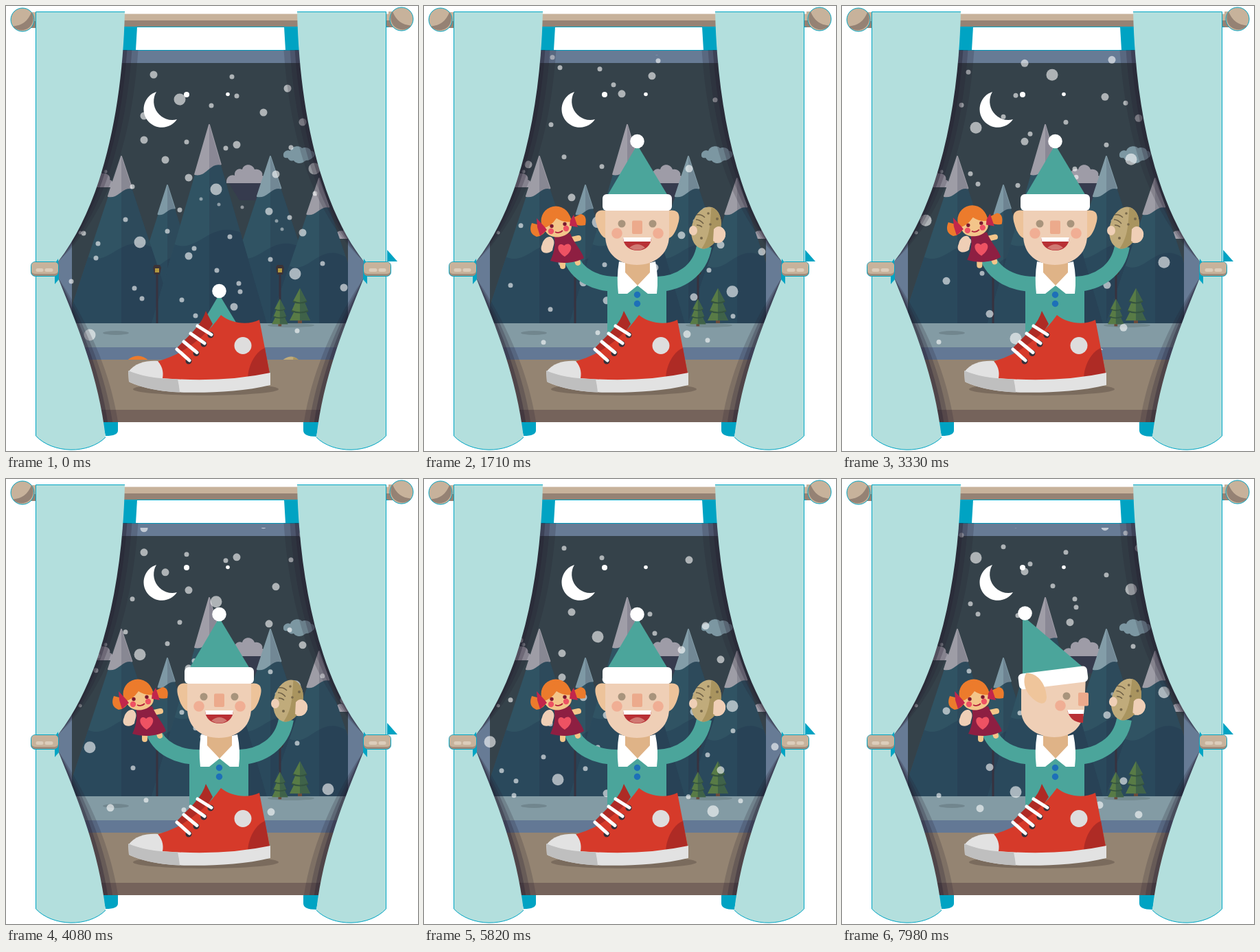
An HTML page for the animation above (8 s loop, 600 by 648 pixels).

```html
<!DOCTYPE html>
<html lang="en">
<head>
<meta charset="utf-8">
<title>Elf in a shoe</title>
<style>
html, body { margin: 0; height: 100%; overflow: hidden; background: #fff; }
svg { display: block; width: 100%; height: 100%; }
.teal { fill: #4ba59b; }
.skin { fill: #efcfb6; }
.white { fill: #fff; }
.sleeve { fill: none; stroke: #4ba59b; stroke-width: 22; }
</style>
</head>
<body>
<svg viewBox="0 0 600 648">
  <defs>
    <clipPath id="glass"><rect x="96" y="83" width="402" height="414"/></clipPath>
    <clipPath id="snowArea"><rect x="70" y="71" width="450" height="430"/></clipPath>
    <clipPath id="windowArea"><rect x="72" y="64" width="453" height="542"/></clipPath>
    <clipPath id="aboveSill"><rect width="600" height="515"/></clipPath>
    <clipPath id="potatoShape"><ellipse cx="411" cy="323" rx="21" ry="31" transform="rotate(15 411 323)"/></clipPath>
    <g id="shade" fill="#241f30">
      <path d="M173 8H179C176 150 147 290 76 372ZM76 396C103 452 141 532 151 628H100Z" opacity=".35"/>
      <path d="M173 8H186C183 150 155 290 76 372ZM76 396C108 452 148 532 158 628H100Z" opacity=".25"/>
      <path d="M173 8H195C192 150 165 290 76 372ZM76 396C114 452 156 532 166 628H100Z" opacity=".2"/>
    </g>
    <g id="curtain">
      <path d="M43 8H173C170 150 140 290 76 372V396C98 452 134 532 145 628C120 653 68 652 43 626Z" fill="#b3dfdd"/>
      <path d="M173 8.500H43.500V626C68 652 120 653 145 628" fill="none" stroke="#00a5c4"/>
      <path d="M76 368L71 375V405L77 398Z" fill="#00a5c4"/>
      <rect x="36.500" y="372.500" width="40" height="21" rx="6" fill="#a08c7b" stroke="#00a5c4"/>
      <rect x="37" y="373" width="39" height="17" rx="5" fill="#c7b29b"/>
      <path d="M46 384.500H52M59 384.500H66" stroke="#dccdbb" stroke-width="5" stroke-linecap="round"/>
    </g>
    <g id="knob">
      <path d="M34 9H43V32H34Z" fill="#c7b29b"/>
      <path d="M37 22H43V32H37Z" fill="#958274"/>
      <circle cx="24" cy="20" r="17" fill="#c7b29b" stroke="#00a5c4"/>
      <path d="M10 29.500Q30 28 37 9A17 17 0 0 1 10 29.500Z" fill="#958274"/>
    </g>
    <g id="lamp">
      <path d="M220 389V462" stroke="#37323f" stroke-width="3"/>
      <path d="M214 381L216 377H224L226 381L224 391H216Z" fill="#3b3338"/>
      <path d="M217 382H223V388H217Z" fill="#b3983f"/>
    </g>
    <g id="tree">
      <path d="M425 452H431V462H425Z" fill="#6b4b3c"/>
      <path d="M428 411L438 430H434L440 444H436L443 458H413L420 444H416L422 430H418Z" fill="#587b46"/>
      <path d="M428 411L438 430H434L440 444H436L443 458H428Z" fill="#3f6249"/>
      <path d="M418 430Q428 435 438 430M416 444Q428 449 440 444" stroke="#34533f" stroke-width="2" fill="none"/>
    </g>
    <path id="cloud" d="M321 258C320 247 330 245 333 247C332 238 340 236 344 238C346 229 359 229 362 238C370 236 375 243 373 247C378 248 379 254 377 258Z"/>
  </defs>

  <path d="M168 30H191L189 64H168ZM428 30H405L407 64H428ZM140 605H163V618Q163 626 145 626ZM456 605H433V618Q433 627 452 627ZM555 355L570 372H555Z" fill="#00a3c3"/>
  <path d="M40 11.500H558V31H40Z" fill="#c7b29b"/>
  <path d="M40 21H558V31H40Z" fill="#958274"/>
  <path d="M40 30.500H558" stroke="#00a5c4"/>
  <use href="#knob"/>
  <use href="#knob" transform="matrix(-1 0 0 1 600 -1)"/>

  <path d="M72 64H525V606H72Z" fill="#677b95"/>
  <path d="M160 64.500H437" stroke="#0096b8"/>
  <path d="M72 462H525V497H72Z" fill="#839ba4"/>
  <path d="M72 497H525V515H72Z" fill="#637895"/>
  <path d="M72 515H525V588H72Z" fill="#948472"/>
  <path d="M72 588H525V606H72Z" fill="#75635b"/>

  <g clip-path="url(#glass)">
    <path d="M96 83H498V463H96Z" fill="#35424a"/>
    <path d="M219 125A26.500 26.500 0 1 0 249 165A27 27 0 0 1 219 125Z" class="white"/>
    <circle cx="263" cy="129" r="4" class="white"/>
    <circle cx="323" cy="128.500" r="2.800" class="white"/>
    <path d="M324 257H375V283H340Z" fill="#363b4e"/>
    <g fill="#9e9ca7">
      <use href="#cloud"/>
      <use href="#cloud" transform="translate(-222 6)"/>
      <use href="#cloud" transform="translate(158 81)"/>
    </g>
    <g id="mountains"></g>
    <path d="M404 218C403 211 411 209 414 211C417 203 428 203 431 207C437 204 444 208 444 211C450 211 452 219 446 221C442 226 437 224 435 226C430 231 421 229 419 225C413 227 411 222 410 221C406 222 404 220 404 218Z" fill="#7c97a2"/>
    <path d="M96 462H498V497H96Z" fill="#839ba4"/>
    <ellipse cx="160" cy="476" rx="19" ry="3" fill="#71868e"/>
    <ellipse cx="415" cy="465" rx="34" ry="3" fill="#748b91"/>
    <use href="#lamp"/>
    <use href="#lamp" x="179"/>
    <use href="#tree"/>
    <use href="#tree" transform="translate(65 106) scale(.78)"/>
    <g id="stars" fill="#fff" opacity=".45"></g>
  </g>

  <g clip-path="url(#snowArea)">
    <g id="snow">
      <g id="flakes" fill="#fff" fill-opacity=".6"></g>
      <use href="#flakes" y="-515"/>
      <use href="#flakes" y="-1064"/>
    </g>
  </g>

  <g clip-path="url(#windowArea)">
    <use href="#shade"/>
    <use href="#shade" transform="matrix(-1 0 0 1 597 0)"/>
  </g>

  <ellipse cx="291" cy="558" rx="106" ry="9" fill="#66584d" opacity=".55"/>

  <g clip-path="url(#aboveSill)">
    <g id="elf">
      <path id="leftSleeve" class="sleeve"/>
      <path id="rightSleeve" class="sleeve"/>
      <g id="doll">
        <path d="M202 366V379M221 364L224 374" stroke="#f3c58a" stroke-width="8" stroke-linecap="round"/>
        <path d="M211 341L225 338" stroke="#f3c58a" stroke-width="8" stroke-linecap="round"/>
        <path d="M189 334L213 331C218 345 229 355 233 367C220 375 200 376 184 371C190 358 192 346 189 334Z" fill="#8e1f42"/>
        <path d="M205 365C189 355 196 342 204 349C212 341 222 353 205 365Z" fill="#ee5263"/>
        <path d="M176 321L157 316Q151 331 164 336Q176 334 178 324ZM214 310L228 303Q238 304 235 319Q224 322 214 314Z" fill="#ec7b2c"/>
        <circle cx="192" cy="313" r="21.500" fill="#ec7b2c"/>
        <ellipse cx="195.500" cy="322.500" rx="19.500" ry="14" fill="#f3c58a" transform="rotate(-9 195 322)"/>
        <path d="M174 323Q184 322 193 309Q203 316 215 314Q212 295 193 298Q175 302 174 323Z" fill="#ec7b2c"/>
        <path d="M176 322L164 309L165 322L169 335L179 326ZM213 312L218 304L224 322L212 320Z" fill="#c2264b"/>
        <circle cx="186" cy="320.500" r="2.700" fill="#7b1930"/>
        <circle cx="205" cy="317.500" r="2.700" fill="#7b1930"/>
        <circle cx="185" cy="328" r="4.200" fill="#ee5263"/>
        <circle cx="207" cy="324" r="4.200" fill="#ee5263"/>
        <path d="M191 329Q197 332 202 327" fill="none" stroke="#b3203c" stroke-width="1.800"/>
        <path d="M172 347C174 338 183 333 187 338C192 344 188 349 187 356C180 363 166 360 172 347Z" class="skin"/>
      </g>
      <g id="potato">
        <path d="M420 322C427 315 441 325 439 334C438 344 427 349 417 342Z" class="skin"/>
        <g clip-path="url(#potatoShape)">
          <path d="M385 288H440V358H385Z" fill="#c0ab7b"/>
          <path d="M419 288C416 315 419 335 401 358H440V288Z" fill="#a9945f"/>
        </g>
        <path d="M397 304Q404 303 409 308M396 311Q402 311 407 317M397 319Q402 319 405 322" fill="none" stroke="#6f6046" stroke-width="1.500"/>
        <g fill="#77684a">
          <circle cx="414" cy="302" r="1.800"/><circle cx="427" cy="310" r="2"/><circle cx="417" cy="318" r="1.800"/><circle cx="404" cy="338" r="2"/><circle cx="424" cy="325" r="1.500"/>
        </g>
        <ellipse cx="392" cy="327" rx="6" ry="7" class="skin"/>
        <path d="M422 325C430 315 441 326 439 334C437 344 428 348 421 342Z" class="skin"/>
      </g>
      <path d="M267 401Q267 394 283 394H338Q353 394 353 403V530H267Z" class="teal"/>
      <path d="M293 368H329V392L311 408L293 392Z" fill="#dfb387"/>
      <path d="M284 372Q280 396 283 419H296L311 407L326 419H339Q342 396 337 372L329 374V388L311 407L293 388V374Z" class="white"/>
      <circle cx="310.500" cy="420.500" r="4.700" fill="#1d70b8"/>
      <circle cx="310.500" cy="433.500" r="4.700" fill="#1d70b8"/>

      <g id="front">
        <path d="M266 298C250 295 247 304 251 317C255 332 262 341 270 338ZM355 298C371 295 374 304 370 317C366 332 359 341 351 338Z" fill="#edc39a"/>
        <path d="M264 290H357V334C357 362 335 377 310 377C285 377 264 362 264 334Z" class="skin"/>
        <path d="M310.500 202L267 276H355Z" class="teal"/>
        <rect x="260" y="274" width="101" height="24" rx="6" class="white"/>
        <circle cx="310.500" cy="197" r="10.300" class="white"/>
        <circle cx="288" cy="317" r="5.500" fill="#a8947c"/>
        <circle cx="333" cy="317" r="5.500" fill="#a8947c"/>
        <rect x="303" y="312.500" width="15" height="19.500" rx="2" fill="#ecaa8c"/>
        <circle cx="281" cy="331" r="7.800" fill="#f0ae94"/>
        <circle cx="341" cy="331" r="7.800" fill="#f0ae94"/>
        <path d="M290 337H331C331 349 322 356 311 356C299 356 290 349 290 337Z" fill="#b83035"/>
        <path d="M299 352Q311 342 322 352Q311 359 299 352Z" fill="#d07872"/>
        <path d="M290 337H331L330 343H291Z" class="white"/>
      </g>
      <g id="side">
        <path d="M266 288L360 297V340C358 362 335 376 312 376C285 376 270 360 268 335Z" class="skin"/>
        <path d="M358 199L269 275L358 286Z" class="teal"/>
        <rect x="263" y="278" width="101" height="23" rx="6" class="white" transform="rotate(7 314 290)"/>
        <circle cx="354.500" cy="195.500" r="10.300" class="white"/>
        <path d="M323 318C324 295 340 281 353 283C358 292 356 308 345 318C335 328 324 331 323 318Z" fill="#efc59b"/>
        <rect x="262" y="311" width="15" height="19.500" rx="2" fill="#ecaa8c"/>
        <circle cx="294" cy="316" r="5.500" fill="#a8947c"/>
        <circle cx="303" cy="330" r="7.800" fill="#f0ae94"/>
        <path d="M269 336H293C291 347 283 355 270 355Z" fill="#b83035"/>
        <path d="M269 336H293L291 342H269Z" class="white"/>
      </g>
    </g>
  </g>

  <path d="M291 444C285 465 266 480 246 501L270 510L301 463Z" fill="#ae2b25"/>
  <path d="M313 450C329 463 353 465 369 457L385 540L300 550L220 545L222 517C255 508 288 485 313 450Z" fill="#d63a2a"/>
  <path d="M352 542C353 519 366 502 377 498L385 542Z" fill="#ae2b25"/>
  <circle cx="345" cy="494.500" r="12.500" fill="#dedddd"/>
  <path d="M178 533C188 519 206 516 221 517C229 526 230 536 227 546L180 541Z" fill="#e2e2e2"/>
  <path d="M178 531C192 537 215 542 228 542Q315 549 385 534V552C340 563 280 564 245 562C215 560 190 553 179 547Z" fill="#e2e2e2"/>
  <path d="M178 531C194 538 218 543 250 543.500Q252 552 253 562.500C215 561 190 553 179 547Z" fill="#bfbfbf"/>
  <path d="M298 479h0M288 492h0M277 505.500h0M266 517h0" stroke="#33303a" stroke-width="9" stroke-linecap="round"/>
  <path d="M279 466L299 478.500M269 477L289 491M259 489L278 504.500M249 500L267 516" stroke="#fff" stroke-width="5" stroke-linecap="round"/>

  <use href="#curtain"/>
  <use href="#curtain" transform="matrix(-1 0 0 1 597 0)"/>
</svg>
<script>
const LOOP = 8000, STEP = 30, FALL = 0.1046;
const byId = id => document.getElementById(id);

// x, y pairs grouped by flake radius
const large = [253,136, 449,237, 306,267, 195,344, 421,390, 122,479, 96,289, 469,540];
const medium = [215,100, 410,120, 375,155, 201,160, 432,169, 201,195, 336,202, 232,224,
  393,245, 266,250, 383,299, 432,330, 266,364, 492,410, 332,438, 288,464, 492,179,
  152,567, 386,573, 511,296];
const small = [329,103, 336,131, 299,145, 263,198, 320,207, 184,263, 450,273, 253,297,
  174,311, 413,308, 235,328, 113,331, 134,346, 274,353, 131,367, 461,375, 307,385, 95,401,
  339,404, 341,416, 187,411, 198,426, 256,428, 276,451, 424,473, 326,336, 385,369,
  185,509, 141,141, 415,206, 204,556, 259,570, 126,228];
const stars = [145,241, 108,330, 284,281, 310,289, 344,293, 394,313, 402,325];

const dots = (points, r) => points.map((x, i) =>
  i % 2 ? '' : `<circle cx="${x}" cy="${points[i + 1]}" r="${r}"/>`).join('');
byId('flakes').innerHTML = dots(large, 8.5) + dots(medium, 5.5) + dots(small, 3.5);
byId('stars').innerHTML = dots(stars, 2.5);

function mountain(x, y, slope, cap, snowHeight) {
  const h = 463 - y, w = h * slope, s = snowHeight * slope, mid = y + h * 0.6, m = w * 0.6;
  return `<path d="M${x} ${y}L${x - w} 463H${x + w}Z" fill="#305363"/>
    <path d="M${x - m} ${mid}C${x - m / 3} ${mid + 14} ${x} ${mid - 35} ${x + m * 0.9} ${mid - h * 0.06}L${x + w} 463H${x - w}Z" fill="#2a495c"/>
    <path d="M${x} ${y}L${x - s} ${y + snowHeight}C${x - s * 0.2} ${y + snowHeight * 1.05} ${x} ${y + snowHeight * 0.75} ${x + s * 0.8} ${y + snowHeight * 0.8}Z"
      fill="${cap}" stroke="${cap}" stroke-width="2" stroke-linejoin="round"/>
    <path d="M${x} ${y}V463H${x + w}Z" fill="#1f2136" opacity=".17"/>`;
}
byId('mountains').innerHTML =
  mountain(235, 261, 0.32, '#7e99a5', 42) + mountain(168, 219, 0.33, '#9e9da6', 58) +
  mountain(385, 219, 0.33, '#839da8', 58) + mountain(456, 251, 0.34, '#9e9da6', 52) +
  mountain(296, 173, 0.29, '#a09ea8', 72);

const progress = (t, start, length) => Math.min(1, Math.max(0, (t - start) / length));
const easeInOut = p => p < 0.5 ? 4 * p ** 3 : 1 - 4 * (1 - p) ** 3;
const between = (t, start, end) =>
  easeInOut(progress(t, start, 300)) * (1 - easeInOut(progress(t, end - 300, 300)));

function draw(t) {
  const rise = 218 * (1 - easeInOut(progress(t, 300, 1136)));
  const left = between(t, 1900, 3450), right = between(t, 7300, 9000);
  const dollX = -8 * left, dollY = -5 * left;
  const lookLeft = left > 0.5, lookRight = right > 0.5;
  const move = (id, transform) => byId(id).setAttribute('transform', transform);

  move('snow', `translate(0 ${FALL * t})`);
  move('elf', `translate(0 ${rise})`);
  move('doll', `translate(${dollX} ${dollY}) rotate(${-2 * left} 197 337)`);
  move('potato', `translate(${3 * right} ${-2 * right}) rotate(${2 * right} 411 323)`);
  move('side', lookRight ? 'matrix(-1 0 0 1 621 0)' : '');
  byId('leftSleeve').setAttribute('d', `M280 405C252 405 ${222 + dollX} 393 ${213 + dollX} ${364 + dollY}`);
  byId('rightSleeve').setAttribute('d', `M340 405C372 404 ${402 + 3 * right} 386 ${408 + 3 * right} 350`);
  byId('front').style.display = lookLeft || lookRight ? 'none' : '';
  byId('side').style.display = lookLeft || lookRight ? '' : 'none';
}

const begin = performance.now();
function tick() {
  const t = (performance.now() - begin) % LOOP;
  draw(Math.floor(t / STEP) * STEP);
  requestAnimationFrame(tick);
}
tick();
</script>
</body>
</html>
```
